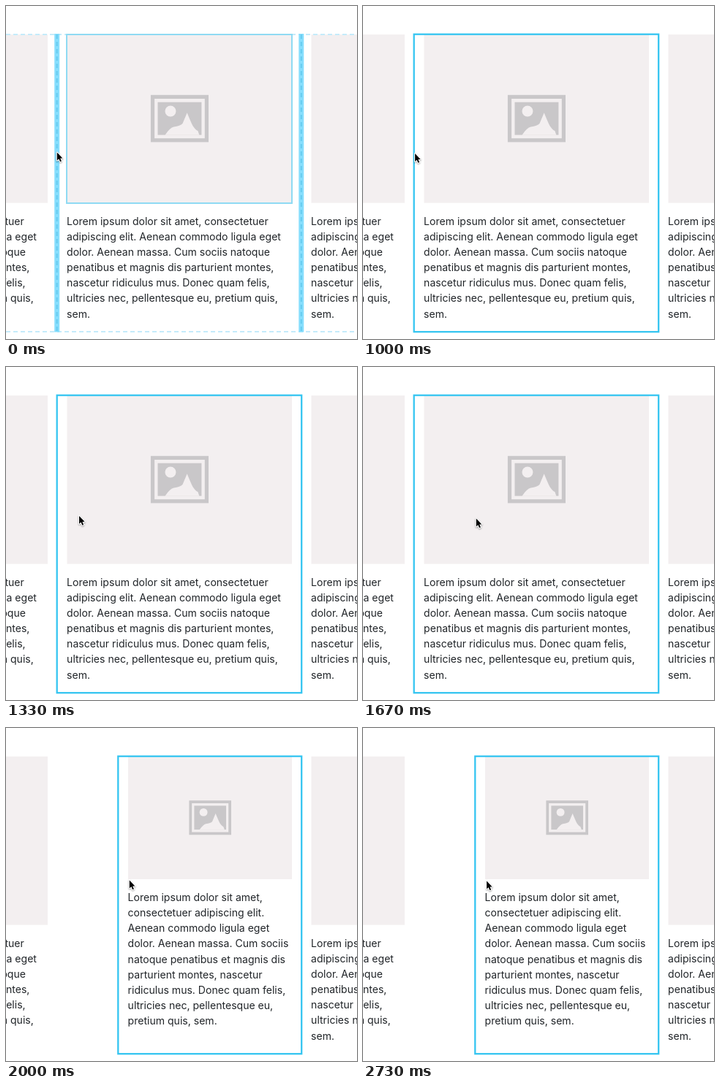
Recreate the animation shown at these times as an HTML page with a canvas. Size 480x456 px, loop 2790 ms.

```html
<!DOCTYPE html>
<html lang="en">
<head>
<meta charset="utf-8">
<title>Column resize</title>
<style>
  html, body { margin: 0; width: 100%; height: 100%; overflow: hidden; background: #fff; }
  canvas { display: block; width: 480px; height: 456px; }
</style>
</head>
<body>
<canvas id="stage"></canvas>
<script>
const W = 480, H = 456, LOOP = 2790, STEP = 200 / 3;
const HOVER = 270, PRESS = 870, DRAG = 1070, RESIZE = 1720, REST = 2130;
const TOP = 39, BOTTOM = 446, LEFT = 69.7, RIGHT = 404.2, PITCH = 334;

const wideText = [
  'Lorem ipsum dolor sit amet, consectetuer',
  'adipiscing elit. Aenean commodo ligula eget',
  'dolor. Aenean massa. Cum sociis natoque',
  'penatibus et magnis dis parturient montes,',
  'nascetur ridiculus mus. Donec quam felis,',
  'ultricies nec, pellentesque eu, pretium quis,',
  'sem.'
];
const narrowText = [
  'Lorem ipsum dolor sit amet,',
  'consectetuer adipiscing elit.',
  'Aenean commodo ligula eget',
  'dolor. Aenean massa. Cum sociis',
  'natoque penatibus et magnis dis',
  'parturient montes, nascetur',
  'ridiculus mus. Donec quam felis,',
  'ultricies nec, pellentesque eu,',
  'pretium quis, sem.'
];

const canvas = document.getElementById('stage');
const ctx = canvas.getContext('2d');
const ratio = window.devicePixelRatio || 1;
canvas.width = W * ratio;
canvas.height = H * ratio;

function box(x, y, w, h, color) {
  ctx.fillStyle = color;
  ctx.fillRect(x, y, w, h);
}

function line(x1, y1, x2, y2, color, width, dash = []) {
  ctx.strokeStyle = color;
  ctx.lineWidth = width;
  ctx.setLineDash(dash);
  ctx.beginPath();
  ctx.moveTo(x1, y1);
  ctx.lineTo(x2, y2);
  ctx.stroke();
  ctx.setLineDash([]);
}

function outline(x, y, w, h, color, width) {
  ctx.strokeStyle = color;
  ctx.lineWidth = width;
  ctx.strokeRect(x, y, w, h);
}

function polygon(points) {
  ctx.beginPath();
  points.forEach(([x, y]) => ctx.lineTo(x, y));
  ctx.closePath();
}

// Placeholder picture, with its icon centred and scaled to the width
function picture(x, w) {
  const paper = '#f3eff0', ink = '#c9c7c9';
  const h = w * 0.75, s = w / 308;
  box(x, TOP, w, h, paper);
  ctx.save();
  ctx.translate(x + w / 2 + 0.2, TOP + h / 2 - 0.2);
  ctx.scale(s, s);
  ctx.strokeStyle = ink;
  ctx.lineWidth = 5.2;
  ctx.strokeRect(-37, -29.75, 74, 59.5);
  box(-30, -22.5, 60, 45, ink);
  ctx.fillStyle = paper;
  ctx.beginPath();
  ctx.arc(-12.5, -10.2, 7.5, 0, 7);
  ctx.fill();
  ctx.beginPath();
  ctx.moveTo(-20, 22.6);
  ctx.quadraticCurveTo(-13, 12.5, -8, 11.5);
  ctx.quadraticCurveTo(1, 10.5, 4, 7);
  ctx.lineTo(10.2, -8);
  ctx.quadraticCurveTo(15.5, 5, 18, 10);
  ctx.quadraticCurveTo(22, 16, 25, 17);
  ctx.lineTo(27, 22.6);
  ctx.closePath();
  ctx.fill();
  ctx.restore();
}

function column(x, w, lines) {
  picture(x, w);
  ctx.fillStyle = '#212529';
  ctx.font = '14.05px Inter, sans-serif';
  const base = TOP + w * 0.75 + 30;
  lines.forEach((text, i) => ctx.fillText(text, x - 0.4, base + i * 21.15));
}

function guides() {
  for (const y of [TOP, BOTTOM]) line(0, y, W, y, '#c5ebfa', 2, [6, 4]);
  outline(83, TOP, 308, 231, '#8fdaf3', 2);
  for (const x of [LEFT, RIGHT - 0.4]) {
    line(x, 38, x, 446.5, '#87defd', 7);
    line(x, 39, x, 446, '#65cbef', 2, [6, 4]);
  }
}

function cursorShape(points) {
  ctx.save();
  ctx.shadowColor = 'rgba(0,0,0,.35)';
  ctx.shadowBlur = 2 * ratio;
  ctx.shadowOffsetY = ratio;
  polygon(points);
  ctx.lineJoin = 'round';
  ctx.strokeStyle = '#fff';
  ctx.lineWidth = 2.2;
  ctx.stroke();
  ctx.restore();
  ctx.fillStyle = '#000';
  ctx.fill();
}

function arrow(x, y) {
  ctx.save();
  ctx.translate(x, y);
  cursorShape([[0.8, 0.5], [0.8, 11.4], [3.3, 9.2], [5.1, 13.3], [6.9, 12.5], [5.2, 8.5], [8.4, 8.4]]);
  ctx.restore();
}

function resizeCursor(x, y) {
  const half = [[-6.5, 0], [-3, -3.5], [-3, -1.2], [-1.6, -1.2], [-1.6, -3.5], [0, -3.5]];
  const upper = half.concat(half.slice(0, -1).reverse().map(([a, b]) => [-a, b]));
  const lower = upper.slice(1, -1).reverse().map(([a, b]) => [a, -b]);
  ctx.save();
  ctx.translate(x, y);
  cursorShape(upper.concat(lower));
  line(0, -3, 0, -1.3, '#fff', 0.8);
  line(0, 1.3, 0, 3, '#fff', 0.8);
  ctx.restore();
}

function pointer(t) {
  if (t < HOVER) return arrow(69, 200);
  if (t < PRESS) return resizeCursor(72, 205);
  if (t < 1667) {
    const u = Math.max(0, (t - DRAG) / 600);
    const x = 84 * u * u * (3 - 2 * u) + 50 * u * u * (u - 1);
    return arrow(70.3 + x, 201.5 + 5.5 * x / 84);
  }
  const u = Math.min(1, (t - 1667) / (REST - 1667));
  const ease = 1 - (1 - u) ** 3;
  arrow(154.3 + 14 * ease, 207 + 2 * u * u);
}

function draw(t) {
  ctx.setTransform(ratio, 0, 0, ratio, 0, 0);
  box(0, 0, W, H, '#fff');
  const narrow = t >= RESIZE;
  column(83.5 - PITCH, 307.5, wideText);
  column(83.5 + PITCH, 307.5, wideText);
  if (narrow) column(167, 224, narrowText);
  else column(83.5, 307.5, wideText);

  if (t < PRESS) guides();
  else {
    const x = narrow ? 153.3 : LEFT;
    outline(x, TOP - 0.3, RIGHT - x, BOTTOM - TOP + 0.5, '#35c5f1', 2.3);
  }
  pointer(t);
}

const start = performance.now();
function tick() {
  const t = (performance.now() - start) % LOOP;
  draw(Math.floor(t / STEP + 0.06) * STEP);
  requestAnimationFrame(tick);
}
tick();
</script>
</body>
</html>
```
